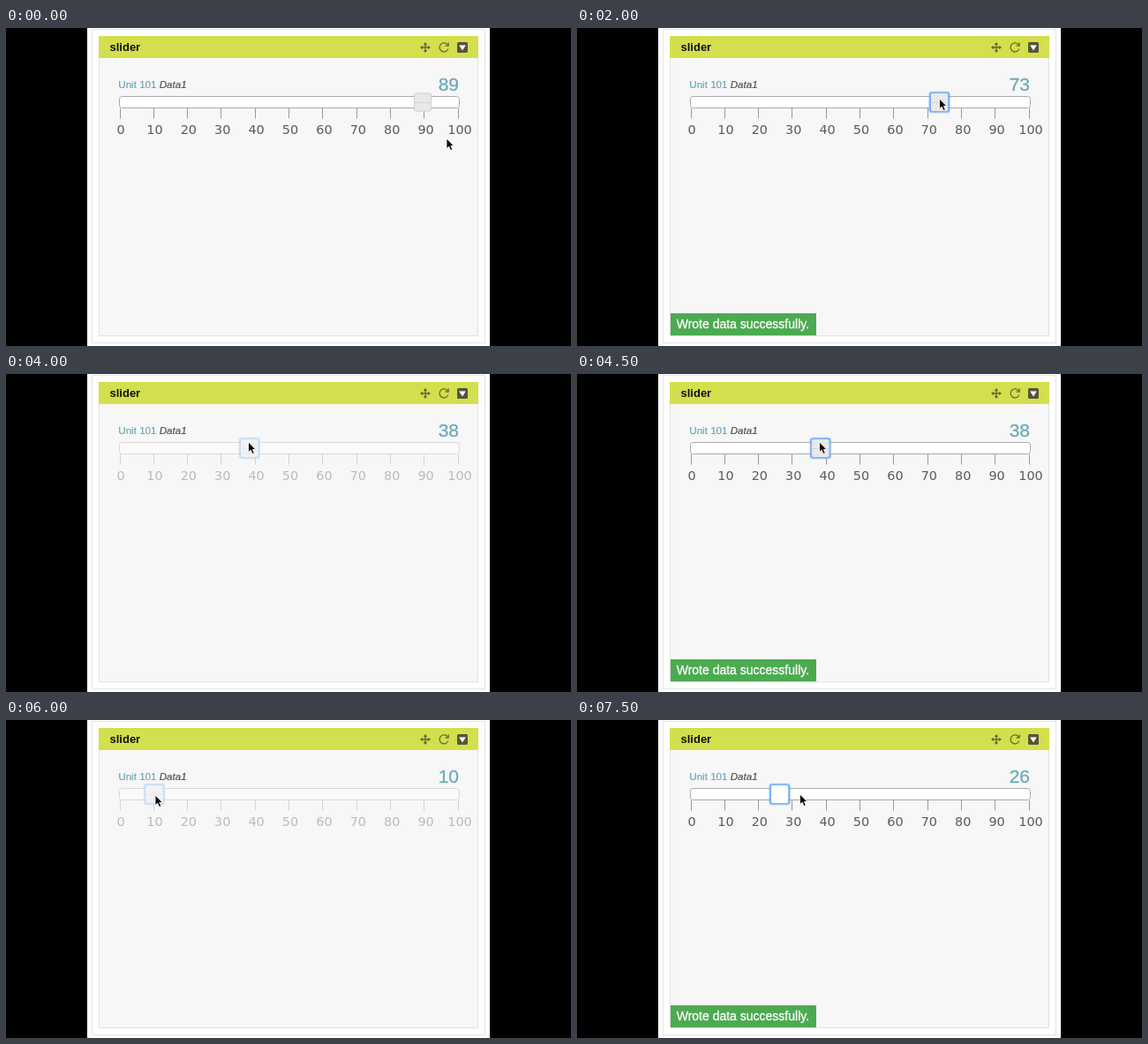
An HTML page that plays this animation: 640x360 px, repeating every 8000 ms.

```html
<!DOCTYPE html>
<html lang="en">
<head>
<meta charset="utf-8">
<title>Slider</title>
<style>
  html, body { margin: 0; width: 100%; height: 100%; overflow: hidden; background: #000; }
  svg { display: block; width: 640px; height: 360px; font-family: "Liberation Sans", Arial, sans-serif; }
  #scale text { font: 14.4px "DejaVu Sans", Verdana, sans-serif; fill: #5b5b5b; text-anchor: middle; }
</style>
</head>
<body>
<svg viewBox="0 0 640 360">
  <rect width="640" height="360"/>
  <rect x="92" width="456" height="360" fill="#fff"/>
  <rect x="97.5" y="1.5" width="445" height="355" fill="none" stroke="#e4e4e4"/>
  <rect x="105.5" y="9.5" width="429" height="339" fill="#f7f7f7" stroke="#e2e2e2"/>
  <rect x="105" y="9" width="430" height="25" fill="#d4df4d"/>
  <text x="117.5" y="26" font-size="13" font-weight="bold" fill="#111">slider</text>

  <g fill="none" stroke="#69692f" stroke-width="1.3">
    <path d="M470 22h10M475 17v10M472 20.5l-2 1.5 2 1.5M478 20.5l2 1.5-2 1.5M473.5 19l1.5-2 1.5 2M473.5 25l1.5 2 1.5-2"/>
    <path d="M500.3 19.2A5 5 0 1 0 500.8 23.6M501.2 16.5v3.7h-3.7"/>
  </g>
  <rect x="511" y="16" width="12" height="12" rx="1.5" fill="#55553c"/>
  <path d="M513.2 19.5h7.6L517 25.5z" fill="#fff"/>

  <text x="127.3" y="68" font-size="11.6" fill="#62a2b2" stroke="#62a2b2" stroke-width=".15">Unit 101 <tspan font-style="italic" fill="#4c4c4c" stroke="#4c4c4c">Data1</tspan></text>
  <text id="value" x="513" y="71" font-size="21" text-anchor="end" fill="#69abb8" stroke="#69abb8" stroke-width=".3"></text>

  <g id="scale">
    <rect x="128.5" y="77.5" width="385" height="13" rx="3" fill="#fff" stroke="#a9a9a9"/>
    <g id="handle">
      <g id="glow" fill="none" stroke="#79b2f3">
        <rect x="-11.5" y="72.5" width="23" height="23" rx="3" stroke-width="2" opacity=".45"/>
        <rect x="-10.5" y="73.5" width="21" height="21" rx="2" stroke-width="2"/>
      </g>
      <rect id="knob" x="-9.5" y="74" width="19" height="20" rx="2"/>
      <path id="grip" d="M-9 84.5H9" stroke="#d6d6d6"/>
    </g>
  </g>

  <g id="toast">
    <rect x="106" y="323" width="165" height="25" fill="#4caa50"/>
    <text x="112.7" y="340" font-size="14" fill="#fff" stroke="#fff" stroke-width=".3">Wrote data successfully.</text>
  </g>
  <path id="cursor" d="M0 0V11.7L2.7 9.2 4.6 13.6 6.8 12.6 4.9 8.4H8.4Z" stroke="#fff" stroke-width=".9"/>
</svg>
<script>
const $ = id => document.getElementById(id);
const STEP = 500;
const DRAG = 1, BUSY = 2, TOAST = 4, BLUR = 8;

// One pose per step: value, pointer x, pointer y, state flags
const poses = [
  [89, 499, 125, BLUR],
  [89, 473, 81, BLUR],
  [85, 449.5, 80, DRAG],
  [73, 410.5, 80, BUSY],
  [73, 410.5, 80, TOAST],
  [62, 364, 80, DRAG | TOAST],
  [37, 266, 79, DRAG | TOAST],
  [38, 274.5, 77, BUSY | TOAST],
  [38, 274.5, 77, BUSY],
  [38, 274.5, 77, TOAST],
  [32, 246, 81, DRAG | TOAST],
  [24, 208.5, 83, DRAG | TOAST],
  [10, 169, 85, BUSY],
  [10, 169, 85, TOAST],
  [16, 200, 85, DRAG | TOAST],
  [26, 252.5, 84, DRAG | TOAST]
];

function add(tag, attrs, text = "") {
  const el = document.createElementNS("http://www.w3.org/2000/svg", tag);
  for (const key in attrs) el.setAttribute(key, attrs[key]);
  el.textContent = text;
  $("scale").insertBefore(el, $("handle"));
}

for (let v = 0; v <= 100; v += 10) {
  const x = Math.floor(129 + v * 3.83) + .5;
  add("path", { d: `M${x} 91V102.5`, stroke: "#999" });
  add("text", { x: 130 + v * 3.84, y: 119.7 }, v);
}

const show = (id, on) => $(id).style.display = on ? "" : "none";
const move = (id, x, y) => $(id).setAttribute("transform", `translate(${x} ${y})`);

function draw(now) {
  const [value, x, y, state] = poses[Math.floor(now / STEP) % poses.length];
  const dragging = state & DRAG;
  $("value").textContent = value;
  $("scale").setAttribute("opacity", state & BUSY ? .38 : 1);
  $("knob").setAttribute("fill", dragging ? "#fff" : "#e8e8e8");
  $("knob").setAttribute("stroke", state & BLUR ? "#d0d0d0" : "none");
  show("glow", !(state & BLUR));
  show("grip", !dragging);
  show("toast", state & TOAST);
  move("handle", 129.5 + value * 3.85, 0);
  move("cursor", x, y);
  requestAnimationFrame(draw);
}
requestAnimationFrame(draw);
</script>
</body>
</html>
```
